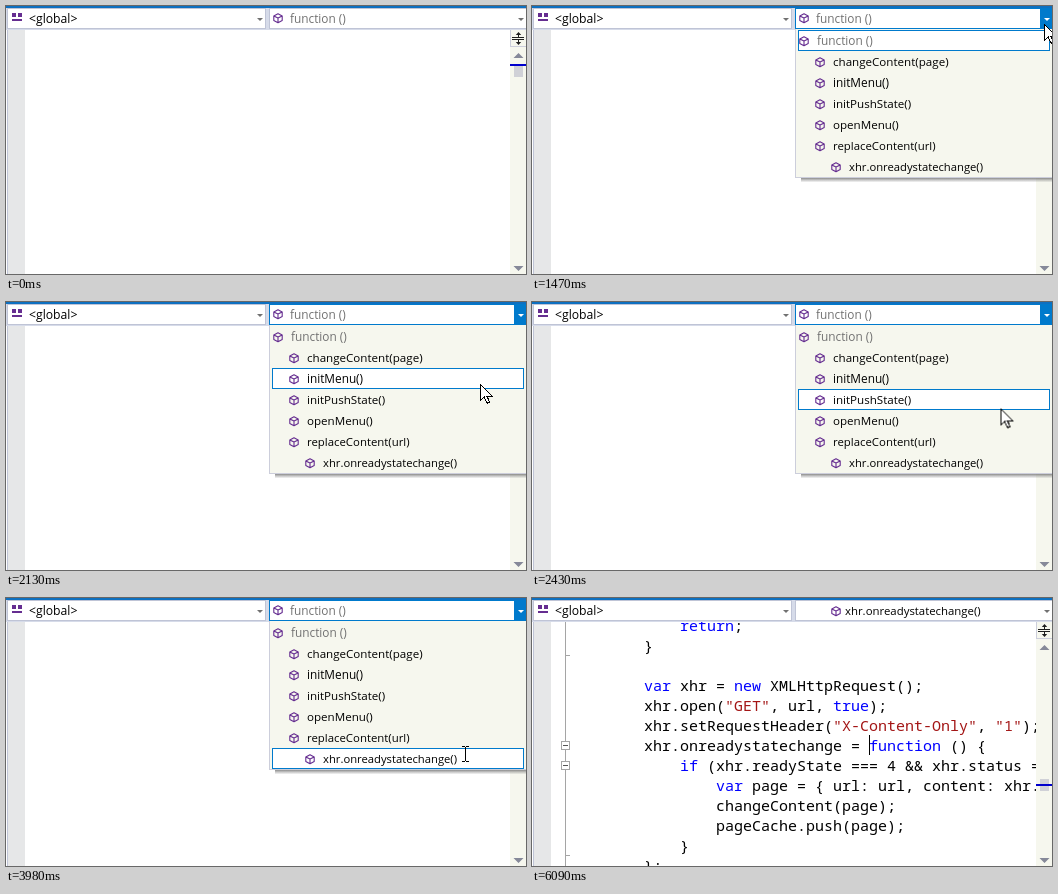
Recreate the animation shown at these times as an HTML page. Size 520 by 268 pixels, loop 6.59 s.

```html
<!DOCTYPE html>
<html lang="en">
<head>
<meta charset="utf-8">
<title>Function dropdown</title>
<style>
html, body { margin: 0; width: 100%; height: 100%; overflow: hidden; background: #fff; }
svg { display: block; width: 520px; height: 268px; }
text { white-space: pre; }
.ui { font: 11.6px "Open Sans", "Noto Sans", sans-serif; fill: #000; }
.code { font: 15px "Noto Sans Mono", "DejaVu Sans Mono", monospace; fill: #000; }
.dim { fill: #717171; }
.k { fill: #00f; }
.s { fill: #a31515; }
.crisp { shape-rendering: crispEdges; }

.anim { animation: 6590ms step-end infinite; }
.before { animation-name: before; }
.after { animation-name: after; }
.hover { animation-name: hover; }
.menu { animation-name: menu; }
.caret-top { animation-name: caret-top; }
.caret-code { animation-name: caret-code; }
.ibeam { animation-name: ibeam; }
.arrow { animation-name: show-arrow; }
.mark { animation-name: mark; }
.pointer { animation-name: pointer; }

/* code replaces the blank editor at 4040 ms */
@keyframes before { 0% { visibility: visible } 61.305%, 100% { visibility: hidden } }
@keyframes after { 0% { visibility: hidden } 61.305%, 100% { visibility: visible } }
@keyframes hover { 0% { visibility: hidden } .455% { visibility: visible } 11.229%, 100% { visibility: hidden } }
@keyframes menu { 0% { visibility: hidden } 11.229% { visibility: visible } 61.305%, 100% { visibility: hidden } }
@keyframes caret-top { 0% { visibility: hidden } 7.284% { visibility: visible } 11.229%, 100% { visibility: hidden } }
@keyframes caret-code {
  0% { visibility: hidden } 61.305% { visibility: visible }
  68.285% { visibility: hidden } 73.293% { visibility: visible }
  84.826% { visibility: hidden } 92.413%, 100% { visibility: visible }
}
@keyframes show-arrow { 0% { visibility: hidden } .455% { visibility: visible } 60.394%, 100% { visibility: hidden } }
@keyframes ibeam { 0% { visibility: hidden } 60.394% { visibility: visible } 62.215%, 100% { visibility: hidden } }
@keyframes mark {
  0% { transform: translateY(0) }
  26.52% { transform: translateY(21px) }
  29.82% { transform: translateY(42px) }
  33.25% { transform: translateY(63px) }
  37.15% { transform: translateY(84px) }
  41.06% { transform: translateY(105px) }
  46.86%, 100% { transform: translateY(126px) }
}
@keyframes pointer {
  0% { transform: translate(520px, 14px) }
  .455% { transform: translate(518px, 14px); animation-timing-function: steps(5) }
  2.731% { transform: translate(512px, 16px) }
  22.307% { transform: translate(512px, 18px); animation-timing-function: steps(22) }
  32.322% { transform: translate(474px, 82px); animation-timing-function: steps(20) }
  41.426% { transform: translate(463px, 131px); animation-timing-function: steps(11) }
  48.862%, 100% { transform: translate(459px, 157px) }
}
</style>
</head>
<body>
<svg viewBox="0 0 520 268">
  <defs>
    <g id="cube" fill="none" stroke="#652d90" stroke-width="1.1" stroke-linejoin="round">
      <path d="M5 .7 9.2 2.9V7.5L5 9.8.8 7.5V2.9ZM.8 2.9 5 5.1 9.2 2.9M5 5.1V9.8"/>
    </g>
    <path id="drop" d="M0 0H6L3 3Z"/>
    <g id="fold" class="crisp">
      <rect x=".5" y=".5" width="8" height="8" fill="#fff" stroke="#a5a5a5"/>
      <path d="M2 4.5H7" stroke="#555"/>
    </g>
    <linearGradient id="shade" x2="0" y2="1">
      <stop stop-color="#666" stop-opacity=".75"/>
      <stop offset="1" stop-color="#888" stop-opacity=".1"/>
    </linearGradient>
  </defs>

  <rect width="520" height="268" fill="#fff"/>
  <rect x="2" y="24" width="17" height="244" fill="#e6e7e8"/>

  <!-- editor text -->
  <g class="anim after">
    <path class="crisp" d="M33.5 24V268M33 57.5H38M33 257.5H38" stroke="#a5a5a5" fill="none"/>
    <use href="#fold" x="29" y="143"/>
    <use href="#fold" x="29" y="163"/>
    <g class="code">
      <text x="148" y="33"><tspan class="k">return</tspan>;</text>
      <text x="112" y="53">}</text>
      <text x="112" y="93"><tspan class="k">var</tspan> xhr = <tspan class="k">new</tspan> XMLHttpRequest();</text>
      <text x="112" y="113">xhr.open(<tspan class="s">"GET"</tspan>, url, <tspan class="k">true</tspan>);</text>
      <text x="112" y="133">xhr.setRequestHeader(<tspan class="s">"X-Content-Only"</tspan>, <tspan class="s">"1"</tspan>);</text>
      <text x="112" y="153">xhr.onreadystatechange = <tspan class="k">function</tspan> () {</text>
      <text x="148" y="173"><tspan class="k">if</tspan> (xhr.readyState === 4 &amp;&amp; xhr.status === 200) {</text>
      <text x="184" y="193"><tspan class="k">var</tspan> page = { url: url, content: xhr.responseText };</text>
      <text x="184" y="213">changeContent(page);</text>
      <text x="184" y="233">pageCache.push(page);</text>
      <text x="148" y="253">}</text>
      <text x="112" y="273">};</text>
    </g>
  </g>
  <rect class="anim caret-top" x="40" y="24" width="1" height="19"/>
  <rect class="anim caret-code" x="337" y="137" width="1" height="20"/>

  <!-- scroll bar -->
  <rect x="504" y="24" width="16" height="244" fill="#f6f7ee"/>
  <path class="crisp" d="M504.5 24V40.5H520" fill="none" stroke="#cccedb"/>
  <path d="M506 31.5H518M506 33.5H518M512.5 27V31M512.5 34V38" stroke="#1e1e1e" fill="none"/>
  <path d="M509.8 29 512.5 26 515.2 29ZM509.8 36 512.5 39 515.2 36Z" fill="#1e1e1e"/>
  <path d="M507.5 52H517.5L512.5 47ZM507.5 260H517.5L512.5 265Z" fill="#868999"/>
  <g class="anim before">
    <rect x="508" y="60" width="9" height="11" fill="#d0d1d7"/>
    <rect x="504" y="58" width="16" height="2" fill="#0000cd"/>
  </g>
  <g class="anim after">
    <rect x="508" y="181" width="9" height="12" fill="#d0d1d7"/>
    <rect x="504" y="186" width="16" height="2" fill="#0000cd"/>
  </g>

  <!-- navigation bar -->
  <rect y="2" width="520" height="22" fill="#d6dbe9"/>
  <rect width="520" height="2" fill="#0e70c0"/>
  <g class="crisp" fill="#fff" stroke="#bfc4d6">
    <path d="M1.5 24V268"/>
    <rect x="1.5" y="2.5" width="258" height="20"/>
    <rect x="263.5" y="2.5" width="258" height="20"/>
  </g>
  <path d="M6 7H10V11H6ZM12 7H16V11H12ZM6 13H16V15H6Z" fill="#652d90"/>
  <text class="ui" x="23" y="17" style="font-size:12.2px">&lt;global&gt;</text>
  <use href="#drop" x="251" y="12" fill="#717171"/>
  <use href="#drop" x="512" y="12" fill="#717171"/>
  <g class="anim hover crisp">
    <rect x="508" y="3" width="12" height="19" fill="#c9def5"/>
    <path d="M520 2.5H263.5V22.5H520M508.5 3V22" fill="none" stroke="#007acc"/>
    <use href="#drop" x="512" y="12" fill="#1e1e1e"/>
  </g>
  <g class="anim before">
    <use href="#cube" x="267" y="7"/>
    <text class="ui dim" x="284" y="17" style="font-size:11.85px">function ()</text>
  </g>
  <g class="anim after">
    <use href="#cube" x="299" y="8"/>
    <text class="ui" x="313" y="17" style="font-size:11.4px">xhr.onreadystatechange()</text>
  </g>

  <!-- open list -->
  <g class="anim menu">
    <g class="crisp">
      <rect x="508" y="3" width="12" height="19" fill="#007acc"/>
      <path d="M520 2.5H263.5V22.5H520" fill="none" stroke="#007acc"/>
    </g>
    <use href="#drop" x="512" y="12" fill="#fff"/>
    <rect x="269" y="172" width="251" height="4" fill="url(#shade)"/>
    <rect x="263" y="23" width="257" height="149" fill="#f6f7ee"/>
    <path class="crisp" d="M263.5 23V171.5H520" fill="none" stroke="#cccedb"/>
    <rect class="anim mark crisp" x="266.5" y="24.5" width="251" height="20" fill="#fff" stroke="#007acc"/>
    <use href="#cube" x="267" y="30"/>
    <use href="#cube" x="283" y="51"/>
    <use href="#cube" x="283" y="72"/>
    <use href="#cube" x="283" y="93"/>
    <use href="#cube" x="283" y="114"/>
    <use href="#cube" x="283" y="135"/>
    <use href="#cube" x="299" y="156"/>
    <g class="ui">
      <text class="dim" x="285" y="39" style="font-size:11.85px">function ()</text>
      <text x="301" y="60">changeContent(page)</text>
      <text x="301" y="81" style="font-size:11.8px">initMenu()</text>
      <text x="301" y="102">initPushState()</text>
      <text x="301" y="123">openMenu()</text>
      <text x="301" y="144" style="font-size:11.4px">replaceContent(url)</text>
      <text x="317" y="165" style="font-size:11.25px">xhr.onreadystatechange()</text>
    </g>
  </g>

  <!-- mouse -->
  <g class="anim arrow">
    <path class="anim pointer crisp" d="M.5 .5V16.5L4.2 13 7 19.2 9.6 18 6.8 12H11.8Z" fill="#fff" stroke="#000"/>
  </g>
  <path class="anim ibeam crisp" d="M456 148.5H459M460 148.5H463M459.5 149V163M456 163.5H459M460 163.5H463" stroke="#000" fill="none"/>
</svg>
</body>
</html>
```
